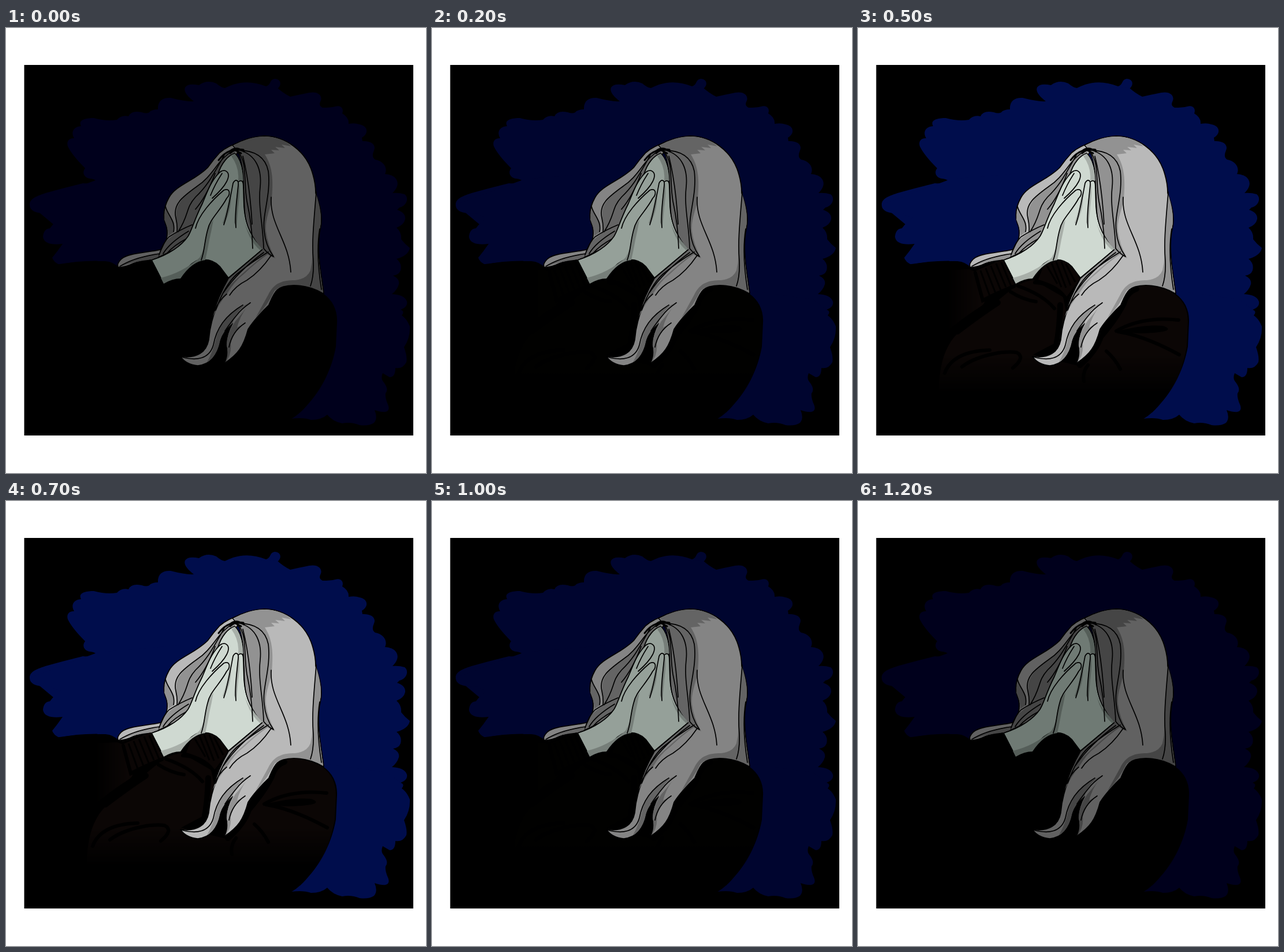
Animation, 727 px wide and 771 px high, one loop 3200 ms. Source, as an HTML page:

```html
<!DOCTYPE html>
<html lang="en">
<head>
<meta charset="utf-8">
<title>Grief</title>
<style>
  html, body { margin: 0; width: 100%; height: 100%; overflow: hidden; background: #fff; }
  svg { display: block; width: 100%; height: 100%; }
  .night { fill: var(--night); }
  .hair { fill: var(--hair); }
  .lock { fill: var(--lock); }
  .skin { fill: var(--skin); }
  .palm { fill: var(--palm); }
  .knit { fill: var(--knit); }
  .ink { fill: none; stroke: #000; stroke-width: 1.7; stroke-linecap: round; stroke-linejoin: round; }
  .edge { stroke: #000; stroke-width: 1.7; stroke-linejoin: round; }
  .fold { fill: none; stroke: #000; stroke-width: 6; stroke-linecap: round; }
  .rib { fill: none; stroke: #000; stroke-width: 3; }
  .knot { stroke-width: 3; }
  .deep { stroke-width: 10; }
</style>
</head>
<body>
<svg viewBox="0 0 727 771" preserveAspectRatio="none">
  <defs>
    <linearGradient id="fade" gradientUnits="userSpaceOnUse" x1="0" y1="565" x2="0" y2="632">
      <stop offset="0" stop-color="#fff"/><stop offset="1" stop-color="#000"/>
    </linearGradient>
    <linearGradient id="side" gradientUnits="userSpaceOnUse" x1="155" y1="0" x2="212" y2="0">
      <stop offset="0" stop-color="#000"/><stop offset="1" stop-color="#fff"/>
    </linearGradient>
    <mask id="low" maskUnits="userSpaceOnUse" x="0" y="0" width="727" height="771"><rect width="727" height="771" fill="url(#fade)"/></mask>
    <mask id="far" maskUnits="userSpaceOnUse" x="0" y="0" width="727" height="771"><rect width="727" height="771" fill="url(#side)"/></mask>
  </defs>

  <rect x="31.5" y="64" width="673.5" height="642"/>

  <!-- night backdrop -->
  <path class="night" d="M41 306C41 296 52 291 72 285C100 277 118 273 133 269Q146 270 160 267Q152 261 146 261C135 260 131 250 137 243
    Q114 220 107 205C104 196 110 190 118 191C112 181 116 171 130 170C124 159 138 156 152 156Q174 162 192 159Q200 150 212 153Q217 142 235 146
    Q246 150 250 144Q256 141 263 141C262 126 272 120 285 121Q312 128 325 127C314 118 307 110 310 103Q315 95 334 99Q348 89 364 96
    Q372 103 379 104Q385 101 393 98Q420 89 450 101C460 98 455 90 465 88C476 88 478 99 470 105V430H190Z"/>
  <path class="night" d="M194 425L192 412Q184 404 172 404Q130 402 92 410Q82 405 80 398Q89 387 98 374C80 376 66 374 64 362
    Q65 348 76 347Q84 336 96 328Q86 328 78 321C56 322 41 319 41 306L160 262L300 250V425Z"/>
  <path class="night" d="M440 102L470 104Q480 113 492 119Q509 115 525 112C542 109 549 119 544 128Q541 135 548 138Q562 138 570 136
    C581 133 585 141 582 148Q594 155 593 166Q604 164 612 167C627 170 628 183 616 190L617 196C633 195 641 203 637 212Q632 224 639 228
    C654 231 661 242 656 253Q664 253 672 258C681 266 679 276 669 286Q680 285 690 288C698 294 694 308 681 311L677 315
    Q692 320 691 331Q689 341 676 346Q685 354 684 366Q690 374 699 381Q697 394 676 400Q686 408 683 420Q680 428 670 429
    Q682 435 680 444Q677 454 668 461Q690 462 694 474Q696 484 680 489L440 500Z"/>
  <path class="night" d="M440 440L660 470L683 488Q691 491 685 498Q694 504 699 517Q700 537 689 553Q695 570 693 579Q687 591 674 589
    Q674 605 664 605L652 598Q648 608 654 614Q663 626 657 633Q656 641 661 652C666 664 659 669 638 662Q644 676 637 684
    Q628 690 612 688Q597 682 582 685Q566 682 556 670Q546 679 528 679Q515 674 493 677L440 660Z"/>

  <!-- body -->
  <path d="M85 410Q130 403 172 404Q186 405 195 415L255 398L275 440L330 400L360 400L386 432L455 480C462 458 470 446 498 443
    Q530 446 549 460C566 472 574 490 573 510L571 552C564 592 545 628 520 655Q507 670 493 678L440 705H35V410Z"/>
  <g mask="url(#far)"><path class="knit" d="M192 418L203 422L214 468Q226 474 210 484Q185 500 150 528V420Z"/></g>
  <g mask="url(#low)">
    <path class="knit" d="M140 632C140 580 152 545 180 522Q236 478 270 449Q290 437 305 437L355 466L360 490L352 540L303 566L380 585
      L422 525Q452 492 464 460Q475 447 498 446Q530 448 549 462C564 474 571 488 571 510L569 552Q560 600 540 632Z"/>
  </g>
  <path class="fold deep" d="M350 480Q349 520 344 545M384 584Q412 560 420 535Q448 502 460 477Q466 457 482 452M172 526Q214 494 242 476"/>
  <path class="fold" d="M277 447Q320 462 340 486M264 457Q286 471 308 474M180 587C204 568 250 559 274 562Q291 570 268 589
    M150 598Q164 560 228 558M447 525Q492 499 555 506M450 526Q498 534 556 566M430 560Q444 572 454 591M398 584Q388 597 391 612"/>
  <path d="M448 526Q492 513 528 516Q545 522 528 526Q488 532 448 526Z"/>

  <!-- hair behind the hands -->
  <path class="hair edge" d="M268 384C240 390 212 390 200 400Q190 410 195 415Q208 414 220 408Q236 402 253 401L305 385L300 365Z"/>
  <path class="lock" d="M196 414Q222 397 267 390L290 385L253 401Q220 404 196 414Z"/>
  <path class="ink" d="M197 413Q222 397 266 391"/>
  <path class="hair edge" d="M408 197Q384 204 370 216Q359 228 349 242C326 265 294 272 282 294C271 314 272 331 278 344Q281 360 276 370L264 397L315 372L370 260L400 217Z"/>
  <path class="lock" d="M398 212C366 224 360 255 331 274C307 292 292 305 295 330L297 353L276 370L264 396L315 371L368 262L395 218Z"/>
  <path class="lock" d="M276 311Q282 328 291 338L290 354L281 360Q281 348 274 332Z"/>
  <path class="ink" d="M396 211C366 226 360 255 331 274C308 291 288 304 294 329Q297 342 296 353M378 220C358 255 350 272 328 293C310 313 318 322 298 353
    M276 309C280 325 294 334 290 353M322 341Q300 350 282 362Q271 373 265 393M316 352Q283 372 272 391M314 364Q290 377 279 390
    M362 252Q347 292 328 314"/>

  <!-- face and hands -->
  <path class="skin edge" d="M396 217C384 221 373 234 367 253C354 267 348 285 340 304C325 334 322 350 315 361C304 377 282 393 252 402L273 443
    Q288 434 302 434Q312 413 330 403Q355 397 370 413L385 433L446 382C426 366 414 340 412 310L410 250Q407 228 396 217Z"/>
  <path class="palm" d="M396 218Q408 231 411 264L402 264Q404 241 390 222Z"/>
  <path class="palm" d="M268 433Q305 424 335 398Q343 385 345 366Q349 345 359 332Q356 350 352 367Q349 384 345 402Q322 404 302 434Q288 434 273 443Z"/>
  <path class="palm" d="M389 286Q392 310 378 340L375 338Q383 315 387 289ZM403 268Q406 280 402 310L399 344L395 337Q397 300 403 268ZM411 325Q414 352 434 371L446 382L440 385Q417 366 411 325Z"/>
  <path class="ink" d="M367 253Q373 246 379 247C387 250 386 258 382 266Q376 278 357 295M374 252Q362 270 354 290
    M328 347C333 324 357 298 377 281C388 276 389 288 382 295C370 318 353 330 349 350C343 372 344 386 338 402
    M377 341C384 319 389 290 393 269C397 261 403 263 402 272C399 302 396 325 398 346M402 267C408 261 412 267 411 277"/>

  <!-- cuffs -->
  <path class="knit" d="M203 421L250 401L271 444Q248 452 217 471Z"/>
  <path class="knit" d="M312 436L320 415Q335 402 356 403Q374 414 384 435L360 467Q344 444 312 436Z"/>
  <path class="rib" d="M212 420L228 464M221 416L238 459M230 412L247 454M239 408L256 449M248 406L265 447
    M327 412L345 443M335 407L352 449M343 405L360 450M352 405L368 446M360 409L376 440"/>
  <path class="fold" d="M203 424L216 472Q244 457 270 448M306 441Q341 443 358 466"/>

  <!-- long hair -->
  <path class="hair edge" d="M400 212L392 203C407 195 425 188 447 187C485 188 516 213 528 244Q536 266 536 286C545 310 548 332 544 348C539 370 541 397 545 425L550 460
    Q526 444 498 444C467 446 464 459 455 480Q431 503 419 522C411 552 402 565 378 581Q386 568 381 549Q382 529 392 512Q376 526 371 542
    C366 568 354 583 332 585Q311 583 302 569C330 573 347 562 351 540Q353 513 364 485Q373 457 385 434L446 382C425 365 415 342 413 315L411 250Q408 225 400 212Z"/>
  <path class="lock" d="M401 211L394 204Q420 188 447 188Q478 189 494 205L477 202L483 208L466 206L473 212L459 211L465 217L448 219C461 239 463 262 460 296
    C457 315 448 333 450 352Q453 376 466 399Q449 393 441 380Q421 358 414 315L411 250Q408 225 401 211Z"/>
  <path class="lock" d="M537 288C545 312 547 332 543 348C538 370 540 397 544 425L549 459Q525 445 498 445Q477 445 465 455Q452 482 432 502
    L454 462C464 441 480 437 500 437Q521 435 527 420Q531 404 530 389Q531 340 537 288Z"/>
  <path class="lock" d="M386 434L446 384L455 391Q434 405 412 426Q396 438 383 460Q371 474 358 500Q368 464 386 434Z"/>
  <path class="lock" d="M423 475Q398 488 392 512Q374 526 370 544Q365 568 348 579Q360 556 363 540Q370 510 396 489Z
    M414 511Q394 525 389 547Q391 567 379 580Q386 566 382 549Q382 529 397 508Q406 498 423 476Q405 497 400 519Z"/>
  <path class="hair" d="M452 389Q428 403 406 423Q390 436 381 452Q405 428 452 389Z"/>
  <path class="ink" d="M398 212C431 211 449 224 454 248C459 290 443 323 447 352Q449 376 463 396M405 212C433 220 443 245 440 275C436 310 445 340 446 382
    M402 214C418 235 411 266 417 300Q426 342 427 382M410 222Q422 270 426 340M459 293C456 342 490 368 493 423
    M446 382Q453 391 463 396"/>
  <path class="ink" d="M537 284C533 335 529 369 532 404Q533 430 527 447M543 348Q536 390 546 453
    M454 388Q426 405 400 426Q378 446 363 489M459 394Q440 422 417 437Q397 447 387 463M446 389Q402 421 376 459
    M423 476Q407 487 399 498Q386 514 379 525M414 511Q391 526 386 553M410 480C378 499 364 522 359 549C352 574 329 577 304 570M382 461Q368 472 361 490"/>
  <path class="ink knot" d="M412 214Q398 204 388 213Q377 217 368 229M411 211Q397 208 388 217M393 210L407 217"/>
</svg>
<script>
  // Each tone runs from its dim colour to its bright colour over five steps; the peak is one step beyond.
  const tones = {
    night: [[0, 0, 28], [0, 13, 76]],
    hair: [[97, 97, 97], [185, 185, 185]],
    lock: [[69, 69, 69], [146, 146, 146]],
    skin: [[111, 122, 116], [207, 217, 209]],
    palm: [[85, 94, 89], [168, 175, 169]],
    knit: [[-5, -3, -3], [11, 6, 5]]
  };
  const loop = 3200, stepTime = 100, peak = 6;
  const style = document.documentElement.style;
  const start = performance.now();
  let shown = -1;

  function paint(level) {
    for (const [name, [dim, bright]] of Object.entries(tones)) {
      const rgb = dim.map((v, i) => Math.max(0, Math.round(v + (bright[i] - v) * level / 5)));
      style.setProperty('--' + name, `rgb(${rgb})`);
    }
  }

  function tick(now) {
    const step = Math.floor(Math.max(0, now - start) % loop / stepTime);
    const level = Math.max(0, peak - Math.abs(step - peak));
    if (level !== shown) paint(shown = level);
    requestAnimationFrame(tick);
  }
  tick(start);
</script>
</body>
</html>
```
